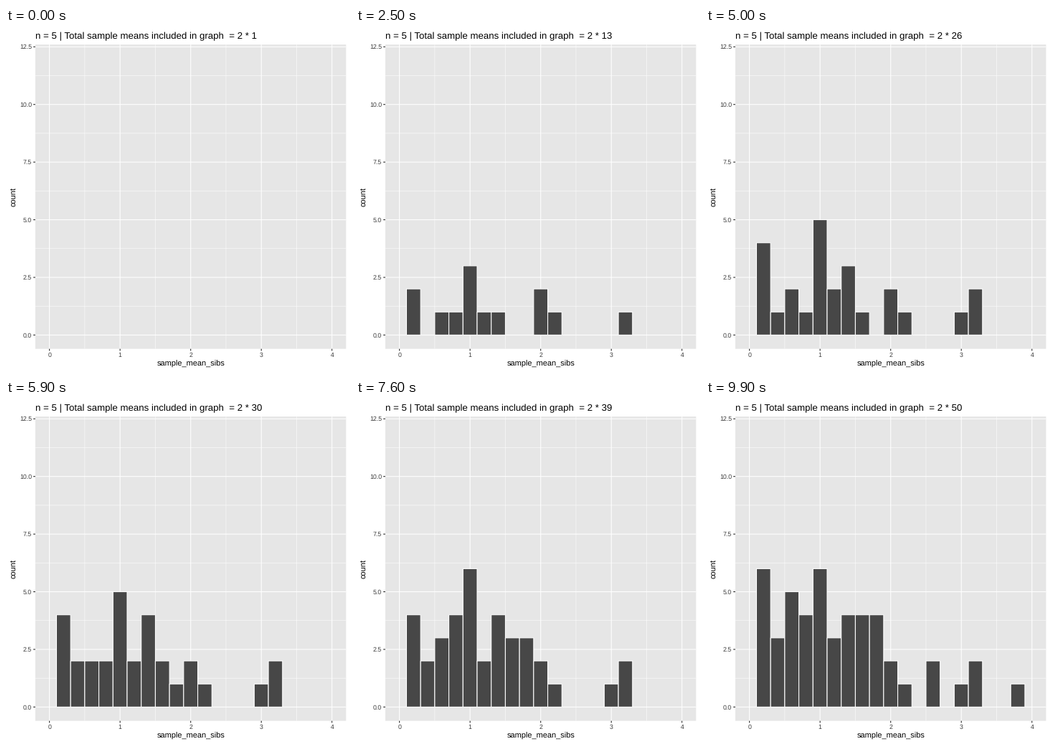
A matplotlib script for the animation above (10000 ms loop, 480 px wide and 480 px high).

```python
import numpy as np
import matplotlib
import matplotlib.pyplot as plt
from matplotlib.animation import FuncAnimation
from matplotlib.patches import Rectangle

matplotlib.rcParams["font.family"] = "Liberation Sans"
matplotlib.rcParams["text.hinting"] = "none"

SIZE, DPI = 480, 80
PX = 72 / DPI  # points per pixel

# Panel edges in pixels and the data scales inside it
LEFT, RIGHT, TOP, BOTTOM = 40.9, 474.5, 23.05, 447.7
X_UNIT = (RIGHT - LEFT) / 4.4
Y_UNIT = (BOTTOM - TOP) / 13.2
BIN = 0.2

PANEL, BAR, TICK, LABEL = "#e6e6e6", "#474747", "#242424", "#3c3c3c"
MAJOR, MINOR = 1.07, 0.53

# Bin of each sample mean in order of drawing; bin 0 lies outside the limits
SAMPLES = [
    10, 1, 7, 16, 11, 6, 1, 10, 5, 4,
    5, 3, 5, 2, 15, 8, 5, 7, 3, 1,
    6, 5, 7, 16, 1, 4, 8, 7, 2, 9,
    0, 9, 4, 3, 5, 8, 9, 4, 1, 6,
    3, 9, 2, 8, 1, 0, 13, 3, 19, 13,
]
BINS = 20


def sx(v):
    return LEFT + (v + 0.2) * X_UNIT


def sy(v):
    return BOTTOM - (v + 0.6) * Y_UNIT


fig = plt.figure(figsize=(SIZE / DPI, SIZE / DPI), dpi=DPI, facecolor="white")
ax = fig.add_axes([0, 0, 1, 1])
ax.set_xlim(0, SIZE)
ax.set_ylim(SIZE, 0)
ax.axis("off")


def line(xs, ys, color, width, z):
    ax.plot(xs, ys, color=color, lw=width * PX, solid_capstyle="butt",
            snap=False, zorder=z)


def text(x, y, s, size, color="black", ha="center", rotation=0):
    return ax.text(x, y, s, fontsize=size * PX, color=color, ha=ha,
                   va="baseline", rotation=rotation, rotation_mode="anchor")


ax.add_patch(Rectangle((LEFT, TOP), RIGHT - LEFT, BOTTOM - TOP,
                       fc=PANEL, lw=0, snap=False, zorder=0))

for v in np.arange(0.5, 4, 1):
    line([sx(v)] * 2, [TOP, BOTTOM], "white", MINOR, 1)
for v in np.arange(1.25, 12, 2.5):
    line([LEFT, RIGHT], [sy(v)] * 2, "white", MINOR, 1)

for v in range(5):
    x = sx(v)
    line([x, x], [TOP, BOTTOM], "white", MAJOR, 2)
    line([x, x], [BOTTOM, BOTTOM + 2.75], TICK, MAJOR, 2)
    text(x, 459, str(v), 8.8, LABEL)
for v in np.arange(0, 13, 2.5):
    y = sy(v)
    line([LEFT, RIGHT], [y, y], "white", MAJOR, 2)
    line([LEFT - 2.75, LEFT], [y, y], TICK, MAJOR, 2)
    text(LEFT - 5, y + 3.1, f"{v:.1f}", 8.8, LABEL, ha="right")

text((LEFT + RIGHT) / 2, 472, "sample_mean_sibs", 11)
text(13.3, (TOP + BOTTOM) / 2, "count", 11, rotation=90)
title = text(LEFT, 15, "", 13.2, ha="left")

bars = []
for b in range(1, BINS):
    bar = Rectangle((sx((b - 0.5) * BIN), sy(0)), BIN * X_UNIT, 0,
                    fc=BAR, ec="white", lw=MAJOR * PX, joinstyle="miter",
                    snap=False, zorder=3)
    bars.append(ax.add_patch(bar))


def update(i):
    # The title counts up on even steps, the new sample lands on odd ones
    title.set_text("n = 5 | Total sample means included in graph  = "
                   f"2 * {i // 2 + 1}")
    counts = np.bincount(SAMPLES[:(i + 1) // 2], minlength=BINS) if i else [0] * BINS
    for bar, n in zip(bars, counts[1:]):
        bar.set_height(-n * Y_UNIT)
        bar.set_visible(n > 0)
    return [title, *bars]


anim = FuncAnimation(fig, update, frames=2 * len(SAMPLES), interval=100,
                     repeat=True, repeat_delay=0)
plt.show()
```
